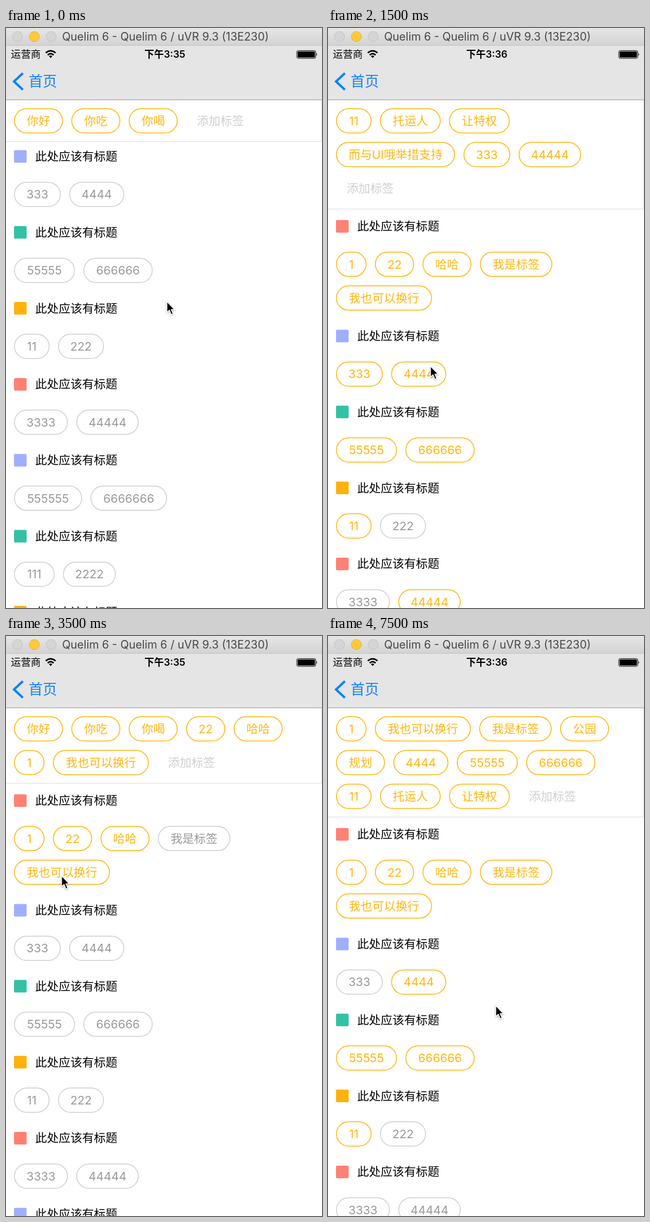
These frames come from a looping animation (552x1014 px, 8000 ms). An HTML page:

```html
<!DOCTYPE html>
<html lang="zh-CN">
<head>
<meta charset="utf-8">
<title>标签</title>
<style>
html, body { margin: 0; width: 100%; height: 100%; overflow: hidden; background: #fff; }
svg { display: block; width: 552px; height: 1014px; }
text { font-family: Inter, "Noto Sans CJK SC", "Noto Sans CJK", sans-serif; white-space: pre; }
</style>
</head>
<body>
<svg id="stage" viewBox="0 0 552 1014" xmlns="http://www.w3.org/2000/svg">
  <defs>
    <linearGradient id="chrome" x2="0" y2="1">
      <stop stop-color="#e6e6e6"/><stop offset="1" stop-color="#d3d3d3"/>
    </linearGradient>
  </defs>
  <g id="content"></g>
  <g id="header"></g>
  <path id="cursor" d="M0 1V20.5L4.4 16.4L7.8 24.2L11 22.8L7.7 15.2H13.6Z" fill="#000" stroke="#fff"
    stroke-width="1.5" stroke-linejoin="round" style="filter:drop-shadow(0 1.5px 1.5px rgba(0,0,0,.35))"/>
</svg>
<script>
const LOOP = 8000, FAST_END = 2000;
const TEXT = 20.5, LEFT = 14, RIGHT = 538, GAP = 14.7, ROW = 59, BAR_TOP = 126;
const ORANGE = '#ffb60f';
const TITLE = 'Quelim 6 - Quelim 6 / uVR 9.3 (13E230)';
const COLORS = ['#ff8172', '#9fafff', '#33c1a6', '#ffb20c'];
const TAGS = ('你好 你吃 你喝 22 哈哈 1 我也可以换行 我是标签 公园 规划 4444 55555 666666 11 ' +
  '托运人 让特权 而与UI哦举措支持 333 44444').split(' ');
const SECTIONS = ['1 22 哈哈 我是标签 我也可以换行', '333 4444', '55555 666666', '11 222',
  '3333 44444', '555555 6666666', '111 2222', '33333 444444'].map(s => s.split(' '));
const ADVANCE = { 1: 8.8, 2: 11.95, 3: 12.4, 4: 12.9, 5: 12.4, 6: 12.75, U: 14.5, I: 5.5 };

// One entry per step: number of tags, pointer x, pointer y.
const STEPS = [
  [0, 264, 523], [3, 281, 477], [5, 215, 354], [7, 97, 418], [8, 330, 354], [9, 320, 292],
  [10, 240, 285], [12, 155, 750], [14, 183, 297], [14, 183, 297], [15, 250, 420], [16, 293, 645],
  [16, 293, 645], [17, 293, 645], [18, 60, 600], [19, 180, 975], [19, 179, 590]
];

const $ = id => document.getElementById(id);

function label(s, x, cy, size, fill, extra = '') {
  return `<text x="${x}" y="${cy + size * .37}" font-size="${size}" fill="${fill}" ${extra}>${s}</text>`;
}

const chipWidth = s => 44.5 + [...s].reduce((sum, c) => sum + (ADVANCE[c] || TEXT), 0);

function chip({ s, x, w, row }, cy, on) {
  const y = cy + row * ROW;
  return `<rect x="${x + .75}" y="${y - 21.25}" width="${w - 1.5}" height="42.5" rx="21.25" fill="#fff"
    stroke="${on ? ORANGE : '#d0d0d0'}" stroke-width="1.5"/>` +
    label(s, x + w / 2, y, TEXT, on ? ORANGE : '#999', 'text-anchor="middle"');
}

function flow(words) {
  let x = LEFT, row = 0;
  const items = words.map(s => {
    const w = chipWidth(s);
    if (x + w > RIGHT) { x = LEFT; row++; }
    const item = { s, x, w, row };
    x += w + GAP;
    return item;
  });
  return { items, x, row };
}

function page(count, scroll) {
  const tags = TAGS.slice(0, count);
  let { items, x, row } = flow(tags);
  if (x + 122 > RIGHT) { x = LEFT; row++; }
  const firstRow = Math.max(0, row - 2);
  const bottom = 199 + (row - firstRow) * ROW;

  let out = '<rect width="552" height="1014" fill="#fff"/>';
  let y = bottom + 29.7 - scroll;
  SECTIONS.forEach((words, i) => {
    const list = flow(words);
    if (y < 1040) {
      out += `<rect x="14" y="${y - 11}" width="22" height="22" rx="2" fill="${COLORS[i % 4]}"/>` +
        label('此处应该有标题', 51, y, TEXT, '#000') +
        list.items.map(c => chip(c, y + 66.4, tags.includes(c.s))).join('');
    }
    y += 132.8 + list.row * ROW;
  });

  out += `<rect x="-1" y="${BAR_TOP}" width="552.5" height="${bottom - BAR_TOP - .5}" fill="#fff" stroke="#dedede"/>`;
  const top = 162.2 - firstRow * ROW;
  out += items.filter(c => c.row >= firstRow).map(c => chip(c, top, true)).join('');
  return out + label('添加标签', x + 18.8, top + row * ROW, TEXT, '#cfcfd2');
}

function home() {
  return '<rect y="125" width="552" height="889" fill="#73949f"/>' +
    '<rect x="238.5" y="486" width="74" height="74" rx="8" fill="#484848"/>' +
    label('点我', 275.5, 523, 26, '#fff', 'text-anchor="middle"');
}

function header(active, clock) {
  const dot = (x, fill, line) => `<circle cx="${x}" cy="15" r="8.8" fill="${fill}" stroke="${line}"/>`;
  const grey = active ? ['#d5d5d5', '#c2c2c2'] : ['#dcdcdc', '#d2d2d2'];
  const nav = active
    ? '<path d="M29.5 79L14 93.5L29.5 108" fill="none" stroke="#0f82fb" stroke-width="4"/>' +
      label('首页', 39.5, 93, 24.7, '#0f82fb')
    : label('首页', 275.5, 93, 24.7, '#000', 'text-anchor="middle" font-weight="600"');
  return `<rect width="552" height="30" fill="${active ? 'url(#chrome)' : '#fafafa'}"/>
    <rect y="30" width="552" height="95" fill="#e5e5e5"/>
    <rect y="30" width="552" height="1" fill="${active ? '#c4c4c4' : '#dcdcdc'}"/>
    <rect y="125" width="552" height="1" fill="#a6a6a6"/>` +
    dot(20, ...grey) + dot(49.5, ...(active ? ['#ffc93c', '#e6b13a'] : grey)) + dot(79, ...grey) +
    label(TITLE, 278.5, 15, 19.5, active ? '#484848' : '#b0b0b0', 'text-anchor="middle"') +
    label('运营商', 8.5, 46, 17.4, '#000') +
    `<g fill="none" stroke="#000" stroke-width="2.6">
      <path d="M69.5 43.6Q78 36.2 86.5 43.6M72.8 47.2Q78 42.6 83.2 47.2"/>
      <path d="M75 49.3Q78 47 81 49.3L78 52.5Z" fill="#000" stroke="none"/>
    </g>` +
    label(clock, 277.5, 46, 17, '#000', 'text-anchor="middle" font-weight="600"') +
    `<rect x="508" y="39.5" width="33" height="13.5" rx="2.5" fill="none" stroke="#000"/>
    <rect x="509.5" y="41" width="30" height="10.5" rx="1.2"/>
    <path d="M542.3 44Q544.6 46.2 542.3 48.6Z"/>` + nav;
}

let shown = -1;
function draw(t) {
  const step = t < FAST_END ? 1 + Math.floor(t / 100) : Math.floor((t - FAST_END) / 500);
  const index = Math.min(step, STEPS.length - 1);
  if (index === shown) return;
  shown = index;
  const [count, x, y] = STEPS[index];
  $('content').innerHTML = index ? page(count, index === 1 ? 196 : 0) : home();
  $('header').innerHTML = header(index > 0, index < 10 ? '下午3:35' : '下午3:36');
  $('cursor').setAttribute('transform', `translate(${x} ${y})`);
}

const start = performance.now();
function tick() {
  draw((performance.now() - start) % LOOP);
  requestAnimationFrame(tick);
}
tick();
</script>
</body>
</html>
```
